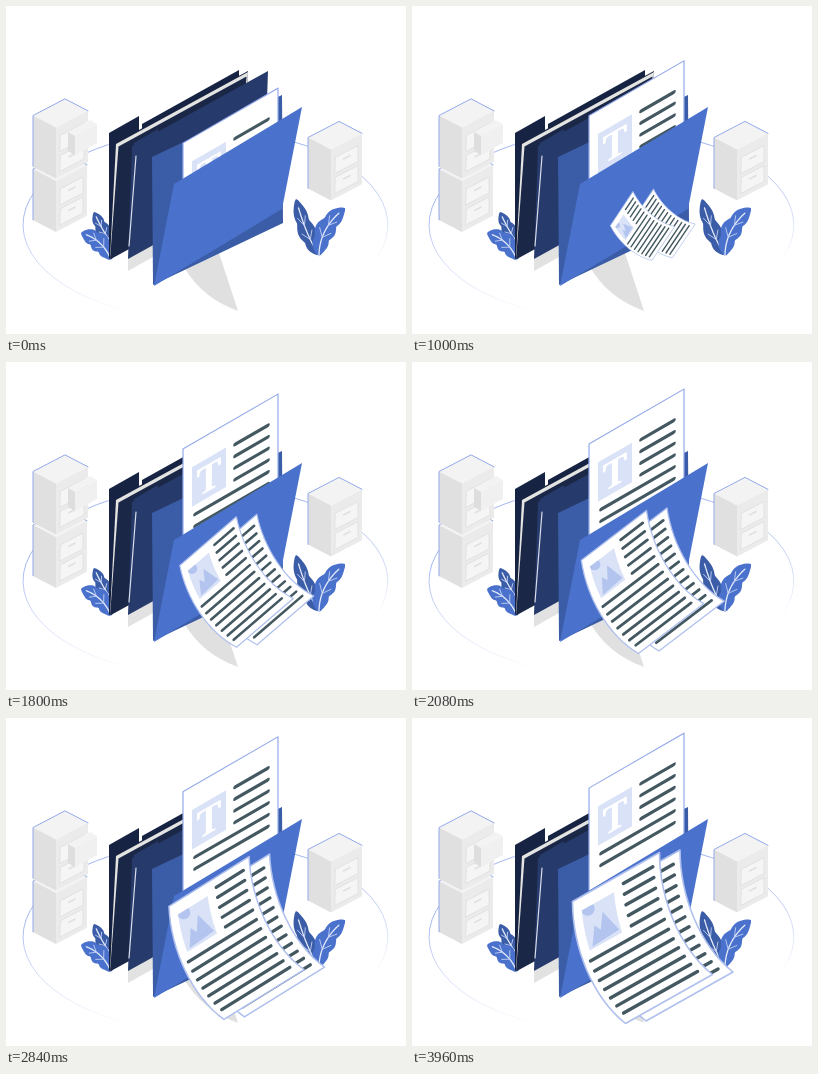
These frames come from a looping animation (400x328 px, 4000 ms). An HTML page with a canvas:

```html
<!DOCTYPE html>
<html lang="en">
<head>
<meta charset="utf-8">
<title>Documents</title>
<style>
html, body { margin: 0; width: 100%; height: 100%; overflow: hidden; background: #fff; }
canvas { display: block; width: 400px; height: 328px; }
</style>
</head>
<body>
<canvas id="stage" width="400" height="328"></canvas>
<script>
const ctx = document.getElementById('stage').getContext('2d');
const LOOP = 4000, STEP = 40, SLOPE = 0.52;
const INK = '#435860', EDGE = '#afc0ee', OUTLINE = '#93a9ea', PALE = '#d9e2f7', PEAK = '#b3c4ee';
const BLUE = '#4a72cc', DEEP = '#3b5ca6', NAVY = '#172342';

function trace(points) {
  ctx.beginPath();
  points.forEach(([x, y]) => ctx.lineTo(x, y));
}

function poly(points, fill, stroke, width = 1) {
  trace(points);
  ctx.closePath();
  ctx.fillStyle = fill;
  ctx.fill();
  if (!stroke) return;
  ctx.strokeStyle = stroke;
  ctx.lineWidth = width;
  ctx.stroke();
}

function line(points, color, width) {
  trace(points);
  ctx.strokeStyle = color;
  ctx.lineWidth = width;
  ctx.stroke();
}

// Parallelogram: the top edge rises to the right, the sides run by (lean, h)
function panel(x, y, w, rise, lean, h, fill, stroke) {
  poly([[x, y], [x + w, y - rise], [x + w + lean, y - rise + h], [x + lean, y + h]], fill, stroke);
}

// Cubic Bezier easing (.25, .1, .25, 1)
function ease(p) {
  let lo = 0, hi = 1, u = p;
  for (let i = 0; i < 30; i++) {
    u = (lo + hi) / 2;
    const x = 0.75 * u * (1 - u) + u ** 3;
    if (x < p) lo = u; else hi = u;
  }
  return 0.3 * (1 - u) ** 2 * u + 3 * (1 - u) * u * u + u ** 3;
}

function arc(from, to, y0, y1) {
  const fade = ctx.createLinearGradient(0, y0, 0, y1);
  fade.addColorStop(0, '#a3b5ef');
  fade.addColorStop(1, 'rgba(163,181,239,0)');
  ctx.beginPath();
  ctx.ellipse(199.5, 219, 182.5, 95, 0, from, to);
  ctx.strokeStyle = fade;
  ctx.lineWidth = 1;
  ctx.stroke();
}

function drawer(x, y, w) {
  panel(x, y, w, w * SLOPE, 0, 16, '#f5f5f5', '#e2e2e2');
  const hx = x + w * 0.38, hy = y + 6 - w * 0.2;
  line([[hx, hy], [hx + w * 0.27, hy - w * 0.14]], '#dedede', 1.5);
}

function cabinet(x, y, front) {
  const side = 23, h = 51, dy = side * SLOPE, rise = front * SLOPE;
  panel(x, y, front, rise, side, dy, '#f3f3f3');
  panel(x, y, side, -dy, 0, h, '#e0e0e0');
  panel(x + side, y + dy, front, rise, 0, h, '#ebebeb');
  line([[x, y + h], [x, y], [x + front, y - rise], [x + front + side, y - rise + dy]], OUTLINE, 1);
  drawer(x + side + 4, y + dy + 8, front - 8);
  drawer(x + side + 4, y + dy + 28, front - 8);
}

function cabinets() {
  cabinet(27, 163, 31);
  cabinet(27, 109.5, 32);
  cabinet(302, 131.5, 31);
  // Drawer pulled out of the upper cabinet
  panel(62, 126, 22, 12, 7, 4, '#f3f3f3');
  panel(62, 126, 7, -4, 0, 19, '#dedede');
  panel(69, 130, 22, 12, 0, 19, '#f0f0f0');
}

// Lobed leaf around a curved midrib
function leaf(base, bend, tip, width, color) {
  const mid = t => [0, 1].map(k =>
    (1 - t) ** 2 * base[k] + 2 * t * (1 - t) * bend[k] + t * t * tip[k]);
  const off = (t, s) => {
    const [x, y] = mid(t);
    const dx = (1 - t) * (bend[0] - base[0]) + t * (tip[0] - bend[0]);
    const dy = (1 - t) * (bend[1] - base[1]) + t * (tip[1] - bend[1]);
    const half = s * width * Math.sin(Math.PI * t) ** 0.55
      * (0.78 + 0.27 * Math.abs(Math.sin(3 * Math.PI * t)));
    const len = Math.hypot(dx, dy);
    return [x - dy / len * half, y + dx / len * half];
  };
  const steps = Array.from({ length: 41 }, (_, i) => i / 40);
  const sides = steps.map(t => off(t, 1));
  poly(sides.concat(steps.map(t => off(1 - t, -1))), color);
  line(steps.slice(0, 36).map(mid), '#e3eafa', 1.3);
  for (const t of [0.35, 0.6]) {
    for (const s of [-0.6, 0.6]) line([mid(t), off(t + 0.14, s)], '#c3d1f3', 0.9);
  }
}

function plants() {
  leaf([105, 236], [97, 226], [88, 206], 7, DEEP);
  leaf([105, 254], [97, 233], [75, 227], 9.5, BLUE);
  leaf([313, 249], [300, 230], [290, 193], 8.5, DEEP);
  leaf([313, 250], [313, 222], [339, 202], 10, BLUE);
}

function rearFolders() {
  ctx.fillStyle = '#e0e0e0';
  ctx.fill(new Path2D('M178 261L212 244L232 305Q196 292 178 261Z'));
  panel(103, 127, 30, 17, 0, 126, NAVY);
  panel(136, 118, 97, 54, 0, 100, NAVY);
  panel(109, 137, 133, 72, -6, 115, NAVY);
  panel(110, 138, 132, 72, -6, 114, '#e4e4e2');
  panel(112.5, 140.5, 128, 70, -8.5, 113, '#1a2747');
  panel(122, 250, 25, 14, 0, 15, '#e2e2e2');
  panel(128, 137, 24, 14, 0, 20, '#263a6b');
  panel(126, 140, 136, 75, -4, 113, '#263a6b');
  line([[130, 150], [123, 240]], '#d9deea', 1.2);
  panel(146, 151, 130, 62, 1, 128, DEEP);
}

// Flat page that slides up out of the folder
function page(top) {
  ctx.save();
  ctx.transform(1, -0.577, 0, 1, 177, top + 55);
  ctx.fillStyle = '#fff';
  ctx.strokeStyle = OUTLINE;
  ctx.lineWidth = 1.2;
  ctx.fillRect(0, 0, 95, 110);
  ctx.strokeRect(0, 0, 95, 110);
  ctx.fillStyle = PALE;
  ctx.fillRect(9, 23.5, 34, 39.5);
  ctx.fillStyle = '#fff';
  ctx.font = 'bold 38px "Noto Serif", serif';
  ctx.textAlign = 'center';
  ctx.fillText('T', 26, 57);
  for (let i = 0; i < 6; i++) {
    const y = 25.5 + i * 11.7;
    line([[i < 4 ? 52 : 12, y], [85, y]], INK, 3.6);
  }
  ctx.restore();
}

// Point on the curled sheet: u runs across, v runs down, origin at its middle
function at(u, v) {
  const w = 1 - v, a = w ** 3, b = 3 * w * w * v, c = 3 * w * v * v, d = v ** 3;
  return [
    -70 * a - 70 * b - 50 * c - 17 * d + 87 * u,
    -36.5 * a + 9.5 * b + 59.5 * c + 85.5 * d - 49 * u
  ];
}

function strip(u0, u1, v0, v1) {
  const down = [], up = [];
  for (let i = 0; i <= 16; i++) {
    const v = v0 + (v1 - v0) * i / 16;
    down.push(at(u0, v));
    up.unshift(at(u1, v));
  }
  return down.concat(up);
}

function picture() {
  const inBox = (a, b) => at(0.1 + 0.37 * a, 0.1 + 0.29 * b);
  ctx.save();
  poly(strip(0.1, 0.47, 0.1, 0.39), PALE);
  ctx.clip();
  ctx.beginPath();
  ctx.arc(...inBox(0.18, 0.04), 7, 0, 7);
  ctx.fillStyle = PEAK;
  ctx.fill();
  poly([inBox(0.1, 0.95), inBox(0.3, 0.5), inBox(0.45, 0.68), inBox(0.6, 0.3), inBox(0.95, 0.9)], PEAK);
  ctx.restore();
}

// Curled sheet that grows and turns upright around its middle
function sheet(x, y, e) {
  if (e <= 0) return;
  ctx.save();
  ctx.translate(x, y);
  ctx.rotate((e - 1) * Math.PI / 4);
  ctx.scale(e, e);
  poly(strip(0, 1, 0, 1), '#fff', EDGE, 1.6);
  picture();
  for (let i = 0; i < 12; i++) {
    const v = 0.075 + 0.0765 * i;
    line([at(i < 5 ? 0.58 : 0.07, v), at(0.92, v)], INK, 3.4);
  }
  ctx.restore();
}

function draw(time) {
  const e = ease(Math.floor(time % LOOP / STEP) * STEP / LOOP);
  ctx.fillStyle = '#fff';
  ctx.fillRect(0, 0, 400, 328);
  ctx.lineCap = ctx.lineJoin = 'round';
  arc(1.95, 4.15, 200, 308);
  arc(5.2, 6.7, 150, 255);
  cabinets();
  plants();
  rearFolders();
  page(82 - 67 * e);
  panel(168, 178, 128, 77, -20, 102, BLUE);
  sheet(251, 217.5, e);
  sheet(230.5, 220, e);
}

const start = performance.now();
function tick() {
  draw(performance.now() - start);
  requestAnimationFrame(tick);
}
tick();
</script>
</body>
</html>
```
